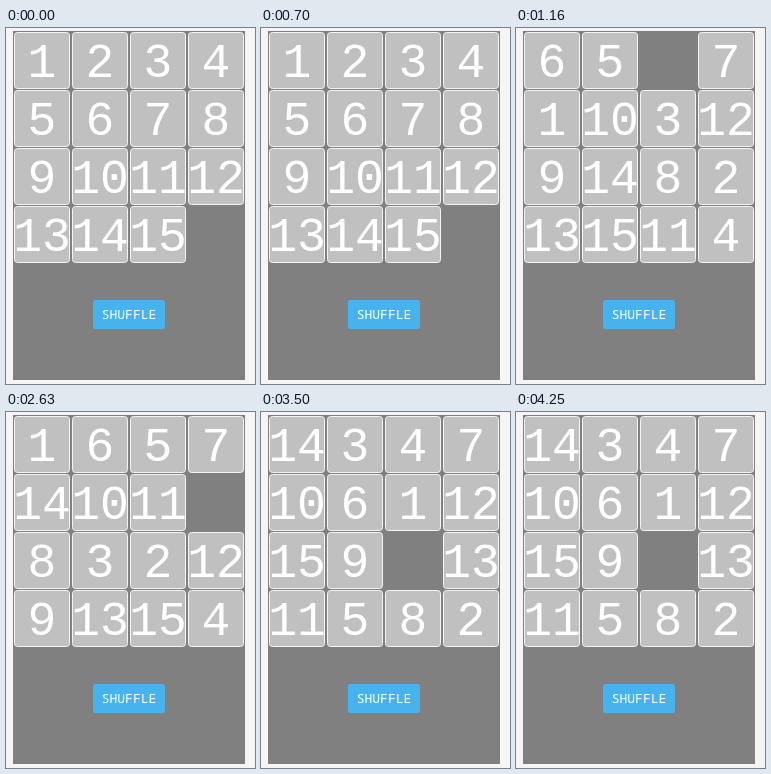
An HTML page that plays this animation: 249x356 px, repeating every 4.75 s.

```html
<!DOCTYPE html>
<html>
<head>
<meta charset="utf-8">
<style>
html, body { margin: 0; width: 100%; height: 100%; overflow: hidden; background: #f5f5f5; }
svg { display: block; width: 100vw; height: 100vh; }
text { fill: #fff; text-anchor: middle; }
.tile rect { fill: #c0c0c0; stroke: #f4f4f4; }
.tile text { font: 48px "Liberation Mono", monospace; }
.label { font: 13px "Noto Sans Mono", monospace; }
</style>
</head>
<body>
<svg viewBox="0 0 249 356">
  <rect x="7" y="3" width="232" height="349" fill="#808080"/>
  <g id="board"></g>
  <rect x="87" y="272" width="72" height="29" rx="2" fill="#46b3ee"/>
  <text class="label" x="123" y="291">SHUFFLE</text>
</svg>
<script>
const LOOP = 4750, SIZE = 4, PITCH = 58;
const solved = Array.from({ length: SIZE * SIZE - 1 }, (_, i) => i + 1).join(" ");
// Tile labels read row by row; a dash is the gap.
const boards = [
  { start: 0, labels: solved },
  { start: 1160, labels: "6 5 - 7  1 10 3 12  9 14 8 2  13 15 11 4" },
  { start: 2630, labels: "1 6 5 7  14 10 11 -  8 3 2 12  9 13 15 4" },
  { start: 3500, labels: "14 3 4 7  10 6 1 12  15 9 - 13  11 5 8 2" }
];
const boardEl = document.getElementById("board");

function tileMarkup(label, i) {
  if (label === "-") return "";
  const x = 8 + i % SIZE * PITCH, y = 4 + Math.floor(i / SIZE) * PITCH;
  return `<g class="tile" transform="translate(${x} ${y})">
    <rect x=".5" y=".5" width="55" height="56" rx="3"/>
    <text x="28" y="45">${label}</text>
  </g>`;
}

let shown;
function draw() {
  const t = performance.now() % LOOP;
  const board = boards.findLast(b => t >= b.start);
  if (board !== shown) {
    shown = board;
    boardEl.innerHTML = board.labels.split(/ +/).map(tileMarkup).join("");
  }
  requestAnimationFrame(draw);
}
draw();
</script>
</body>
</html>
```
